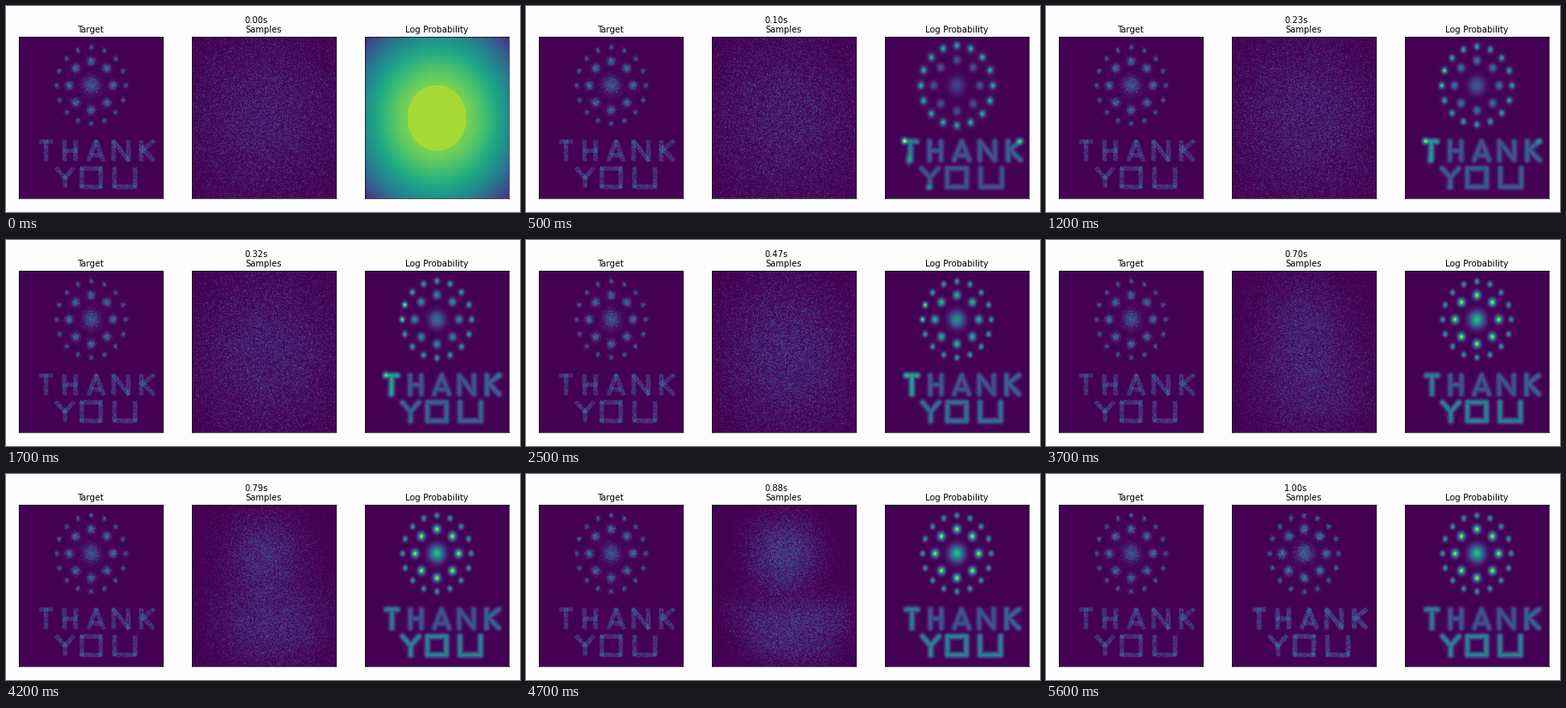
A matplotlib script for the animation above (6100 ms loop, 600 by 241 pixels).

```python
import numpy as np
import matplotlib.pyplot as plt
from matplotlib.animation import FuncAnimation

W, H = 600, 241
DPI = 60
STEPS, LAST = 61, 56           # the end state is held for the remaining steps
LEFT, TOP, PW, PH = 15, 36, 168, 189
PITCH = 202
HUB = np.array([99.0, 93.0])   # middle of the dot rings
BASE = np.array([99.0, 131.0])  # middle of the base gaussian
SPREAD = np.array([60.0, 66.0])

rng = np.random.default_rng(7)

# Strokes on a 5 x 5 grid, written as column-row pairs
GLYPHS = {
    "T": "00-40 20-24", "H": "00-04 40-44 02-42", "A": "04-20-44 13-33",
    "N": "04-00-44-40", "K": "00-04 02-40 12-44",
    "Y": "00-22-40 22-24", "O": "00-40-44-04-00", "U": "00-04-44-40",
}
# Left edge and width of each letter
BOXES = {"T": (40, 13), "H": (68, 13), "A": (96, 17), "N": (125, 17), "K": (157, 14),
         "Y": (59, 19), "O": (88, 22), "U": (126, 24)}


def segments(name):
    left, width = BOXES[name]
    top = 190 if name in "YOU" else 158.5
    for stroke in GLYPHS[name].split():
        pts = [np.array([left + int(c) * width / 4, top + int(r) * 5.4])
               for c, r in stroke.split("-")]
        yield from zip(pts, pts[1:])


def ring(count, rx, ry):
    ang = 2 * np.pi * np.arange(count) / count
    return HUB + np.column_stack([rx * np.cos(ang), ry * np.sin(ang)])


INNER = ring(8, 25.5, 28.5)
OUTER = ring(16, 40, 44.5)


def draw_points():
    """Random points from the target distribution."""
    parts = [rng.normal(HUB, (6.2, 6.6), (3000, 2))]
    parts += [rng.normal(c, (2.9, 3.1), (900, 2)) for c in INNER]
    parts += [rng.normal(c, (1.6, 1.8), (230, 2)) for c in OUTER]
    for name in GLYPHS:
        for a, b in segments(name):
            d = b - a
            size = np.hypot(*d)
            n = int(size * 34)
            along = rng.uniform(-1.5 / size, 1 + 1.5 / size, (n, 1))
            across = rng.uniform(-2.6, 2.6, (n, 1))
            parts.append(a + along * d + across * np.array([-d[1], d[0]]) / size)
    return np.vstack(parts)


def histogram(pts):
    """Counts on a grid twice as fine as the screen."""
    h, _, _ = np.histogram2d(pts[:, 1], pts[:, 0], bins=(2 * PH, 2 * PW),
                             range=((TOP, TOP + PH), (LEFT, LEFT + PW)))
    return h / h.max()


goal = draw_points()
ends = draw_points()
ends += rng.normal(0, 0.6, ends.shape)
noise = rng.normal(0, 1, ends.shape) * SPREAD


def samples(t):
    s = 1 - t * t
    a = np.sqrt(1 - s * s)
    return histogram(BASE + a * (ends - BASE) + s * noise)


X, Y = np.meshgrid(LEFT + 0.5 + np.arange(PW), TOP + 0.5 + np.arange(PH))


def bump(x, y, c, sx, sy):
    return np.exp(-((x - c[0]) / sx) ** 2 / 2 - ((y - c[1]) / sy) ** 2 / 2)


def glow(x, y, name):
    """Soft-edged strokes of one letter."""
    dist = np.full(x.shape, 1e3)
    for a, b in segments(name):
        d = b - a
        u = np.clip(((x - a[0]) * d[0] + (y - a[1]) * d[1]) / (d @ d), 0, 1)
        dist = np.minimum(dist, np.hypot(x - a[0] - u * d[0], y - a[1] - u * d[1]))
    return np.exp(-(dist / 3.1) ** 2)


def density(t):
    ramp = np.clip((t - 0.1) / 0.6, 0, 1)
    fade = 1 - ramp
    swell = np.sin(np.pi * ramp)

    # the rings start slightly too wide
    grow = 1 + 0.05 * fade ** 3
    x = HUB[0] + (X - HUB[0]) / grow
    y = HUB[1] + (Y - HUB[1]) / grow
    img = (0.2 + 0.47 * ramp) * bump(x, y, HUB, 5.8, 6.3)
    for c in INNER:
        img += (0.28 + 0.6 * ramp) * bump(x, y, c, 2.7, 3.0)
    for c in OUTER:
        out = (c - HUB) / (40, 44.5)
        side = max(-out[0] * 0.97 - out[1] * 0.25, 0) ** 12
        img += (0.55 + 0.4 * swell * side) * bump(x, y, c, 1.8, 2.1)
        img += 0.12 * fade ** 3 * bump(x, y, c, 3.5, 4)

    x = HUB[0] + (X - HUB[0]) / (1 + 0.03 * fade ** 3)
    level = {"T": 0.43 + 0.18 * swell, "K": 0.33}
    level.update(dict.fromkeys("HAN", 0.28))
    level.update(dict.fromkeys("YOU", 0.26 + 0.2 * ramp))
    for name, peak in level.items():
        img = np.maximum(img, peak * glow(x, Y, name))

    # hot corners that melt away
    img += 0.6 * fade ** 2 * bump(x, Y, (39.5, 157.5), 2.2, 2.4)
    img += 0.5 * fade ** 3 * bump(x, Y, (170, 158), 2.4, 2.2)
    img += 0.3 * fade ** 4 * bump(x, Y, (44, 180), 2.2, 4)
    img += 0.3 * fade ** 4 * bump(x, Y, (67, 212), 2.6, 2.2)
    return np.clip(img, 0, 1)


R2 = ((X - BASE[0]) / 34.5) ** 2 + ((Y - BASE[1]) / 38.5) ** 2
BLOB = np.where(R2 < 1, 0.865, np.clip(0.86 - 0.062 * R2, 0, 1))


def log_prob(t):
    w = np.clip((0.09 - t) / 0.085, 0, 1) ** 2
    return w * BLOB + (1 - w) * density(t)


def clock(n):
    return np.interp(n, [0, 37, 47, LAST], [0.004, 0.698, 0.88, 1])


plt.rcParams["font.family"] = "DejaVu Sans"
fig = plt.figure(figsize=(W / DPI, H / DPI), dpi=DPI, facecolor="#fefdfe")


def panel(col, title, data, smooth="hanning"):
    ax = fig.add_axes([(LEFT + col * PITCH) / W, 1 - (TOP + PH) / H, PW / W, PH / H])
    ax.set(xticks=[], yticks=[])
    ax.set_title(title, fontsize=12)
    return ax.imshow(data, cmap="viridis", vmin=0, vmax=1, aspect="auto",
                     interpolation=smooth)


panel(0, "Target", histogram(goal))
cloud = panel(1, "Samples", samples(clock(0)))
field = panel(2, "Log Probability", log_prob(clock(0)), "nearest")
label = fig.text(292 / W, 1 - 20 / H, "0.00s", fontsize=12, ha="center", va="baseline")


def update(i):
    t = clock(min(i, LAST))
    cloud.set_data(samples(t))
    field.set_data(log_prob(t))
    label.set_text(f"{t:.2f}s")
    return cloud, field, label


anim = FuncAnimation(fig, update, frames=STEPS, interval=100, repeat=True,
                     repeat_delay=0, blit=False)
plt.show()
```
